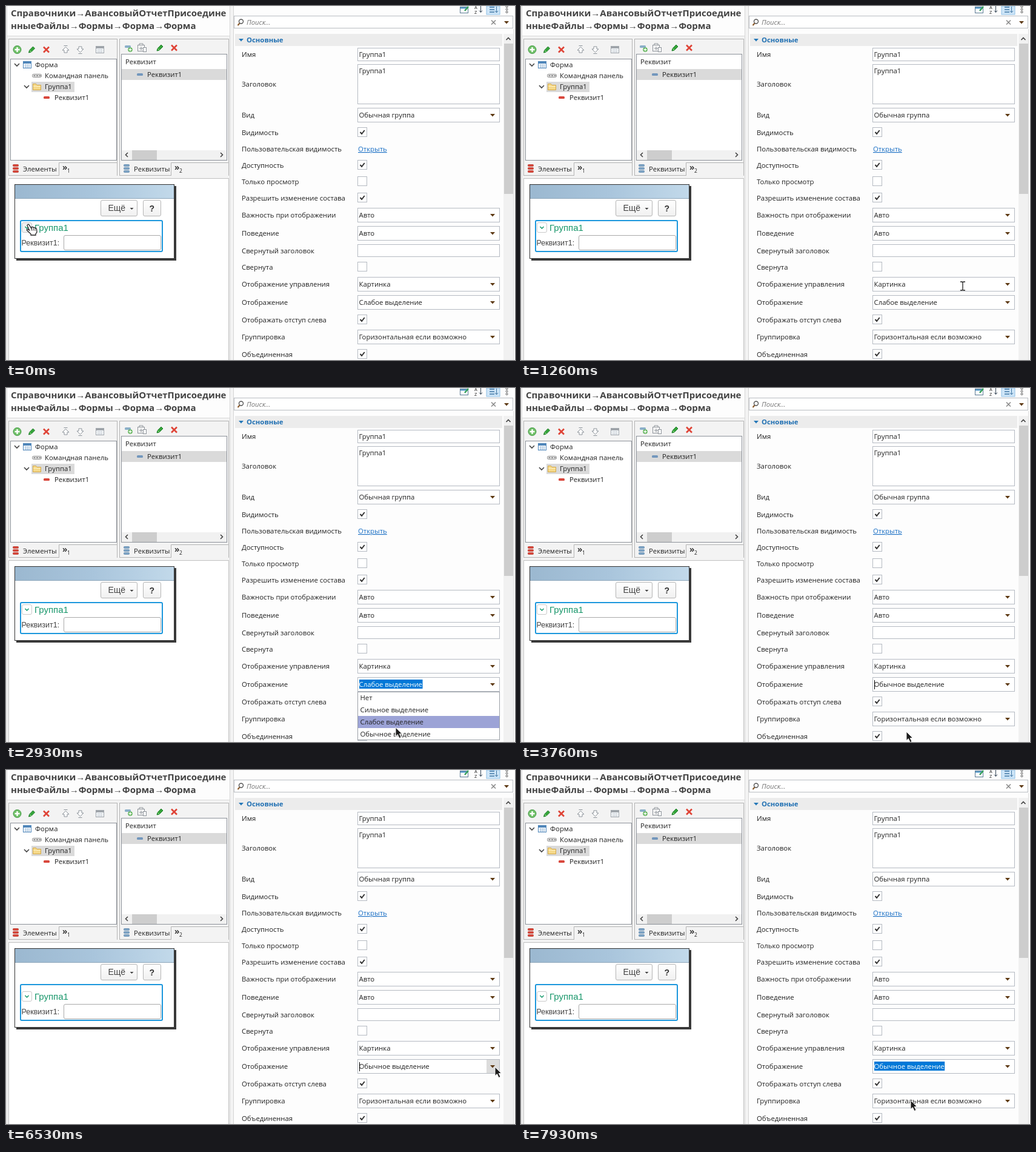
Write an HTML page that moves like this. It is 840 px wide and 584 px high and loops after 8000 ms.

```html
<!DOCTYPE html>
<html lang="ru">
<head>
<meta charset="utf-8">
<style>
html, body { margin: 0; width: 100%; height: 100%; overflow: hidden; background: #fff; }
svg { display: block; width: 840px; height: 584px; }
text { font: 11.35px "Open Sans", "Noto Sans", sans-serif; fill: #222; white-space: pre; }
.title { font-size: 15px; font-weight: 700; fill: #444; }
.bold { font-weight: 700; fill: #1f6fb2; }
.form { font-family: "Liberation Sans", Arial, sans-serif; fill: #444; }
</style>
</head>
<body>
<svg id="stage" viewBox="0 0 840 584" xmlns="http://www.w3.org/2000/svg">
<defs>
<linearGradient id="bar" x2="1" y2="0"><stop stop-color="#9bb8d0"/><stop offset=".5" stop-color="#a9c5dc"/><stop offset="1" stop-color="#c2d9ea"/></linearGradient>
<linearGradient id="btn" x2="0" y2="1"><stop stop-color="#fff"/><stop offset="1" stop-color="#f0f0f0"/></linearGradient>
</defs>
<g id="base"></g>
<g id="form"></g>
<g id="combo"></g>
<g id="popup"></g>
<g id="cursor"></g>
</svg>
<script>
const $ = id => document.getElementById(id);
const box = (x, y, w, h, fill, stroke, extra = '') =>
  `<rect x="${x}" y="${y}" width="${w}" height="${h}" fill="${fill}"${stroke ? ` stroke="${stroke}"` : ''} ${extra}/>`;
const text = (x, y, s, cls = '', style = '') => `<text x="${x}" y="${y}" class="${cls}" style="${style}">${s}</text>`;
const line = (d, stroke, w = 1, extra = '') => `<path d="${d}" fill="none" stroke="${stroke}" stroke-width="${w}" ${extra}/>`;
const shape = (d, fill, stroke = 'none', w = 1) => `<path d="${d}" fill="${fill}" stroke="${stroke}" stroke-width="${w}"/>`;
const at = (x, y, s) => `<g transform="translate(${x} ${y})">${s}</g>`;

const chevron = (x, y, color = '#444') => line(`M${x - 4} ${y - 2}l4 4 4-4`, color, 1.6);
const down = (x, y) => shape(`M${x - 4} ${y - 2}h8l-4 4.5z`, '#5e3a12');
const pencil = (x, y) => at(x, y, shape('M-5 5l1.2-4L2-5 5-2-1 4z', '#35a53a', '#1d7d28') + line('M-3.5 1.5L-.5 4', '#b8e6a8'));
const cross = (x, y) => line(`M${x - 4.5} ${y - 4.5}l9 9m0-9l-9 9`, '#df4437', 2.6);
const bars = (x, y, color, edge) => [0, 5, 10].map(d => box(x + .5, y + d, 9, 3, color, edge, 'rx="1" stroke-width=".7"')).join('');
const pill = (x, y, color) => box(x, y, 10, 4, color, '', 'rx="1.5"');
const dropArrow = (x, y, flip) => at(x, y, shape('M-2.5-5h5v4h3L0 4.5-5.5-1h3z', '#fff', '#8b9299') + line('M-3 6.5h6', '#8b9299'))
  .replace(')"', flip ? ') scale(1 -1)"' : ')"');
const sheet = (x, y, color) => box(x - 6.5, y - 5.5, 13, 11, '#f4f8fc', color) + box(x - 6.5, y - 5.5, 13, 3.5, color) +
  line(`M${x - 4} ${y + .5}h9m-9 3h9`, color, 1, 'stroke-dasharray="2 1"');

const field = (y, h, s = '') => box(580.5, y + .5, 234, h, '#fff', '#b5bac2') + text(582.5, y + 14.5, s);
const combo = (y, s) => box(580.5, y - 11.5, 234, 23, '#fff', '#b5bac2') + text(582.5, y + 4, s) + down(803, y);
const check = (y, on) => box(580.5, y - 7.5, 15, 15, '#fff', '#b5bac2') +
  (on ? line(`M584.5 ${y}l2.6 3 4.6-6`, '#333', 2) : '');

const rows = [
  [80, 'Имя', () => field(69, 21, 'Группа1')],
  [129, 'Заголовок', () => field(96, 65, 'Группа1')],
  [180, 'Вид', y => combo(y, 'Обычная группа')],
  [209, 'Видимость', y => check(y - 1, true)],
  [236, 'Пользовательская видимость', y => text(581, y + 4, 'Открыть', '', 'fill:#1a6fc4;text-decoration:underline')],
  [263, 'Доступность', y => check(y - 1, true)],
  [290, 'Только просмотр', y => check(y - 1)],
  [317, 'Разрешить изменение состава', y => check(y - 1, true)],
  [345, 'Важность при отображении', y => combo(y, 'Авто')],
  [375, 'Поведение', y => combo(y, 'Авто')],
  [404, 'Свернутый заголовок', () => field(393, 20)],
  [431, 'Свернута', y => check(y - 1)],
  [459, 'Отображение управления', y => combo(y, 'Картинка')],
  [489, 'Отображение', () => ''],
  [518, 'Отображать отступ слева', y => check(y - 1, true)],
  [546, 'Группировка', y => combo(y, 'Горизонтальная если возможно')],
  [575, 'Объединенная', y => check(y - 1, true)]
];
const fieldRows = [80, 129, 180, 345, 375, 404, 459, 489, 546];
const items = ['Нет', 'Сильное выделение', 'Слабое выделение', 'Обычное выделение'];

function tabs(x, right, name, num, color, edge) {
  const split = right - (right === 183 ? 96 : 95);
  return bars(x, 261.5, color, edge) + text(x + 17, 273, name) +
    box(split, 258, right - split, 22, '#f3f3f3') + line(`M${split + .5} 280V258.5H${right}`, '#b4b4b4') +
    text(split + 6, 271, '»', '', 'font-size:15px;font-weight:600') + text(split + 14, 275, num, '', 'font-size:8.5px');
}

function leftSide() {
  return box(0, 0, 376, 584, '#f3f3f3') + box(2, 0, 367, 49, '#fdfdfd') + line('M2 49.5h367', '#dadada') +
    text(8, 17, 'Справочники→АвансовыйОтчетПрисоедине', 'title') +
    text(8, 38, 'нныеФайлы→Формы→Форма→Форма', 'title') +
    box(4.5, 54.5, 179, 225, '#f3f3f3', '#b4b4b4') + box(187.5, 54.5, 180, 225, '#f3f3f3', '#b4b4b4') +
    box(7.5, 87.5, 175, 167, '#fff', '#8d929a') + box(190.5, 79.5, 174, 175, '#fff', '#8d929a') +
    // element tree
    `<circle cx="18.5" cy="72" r="6.5" fill="#6fc067" stroke="#479a49"/>` + line('M14.5 72h8m-4-4v8', '#fff', 2.4) +
    pencil(42.5, 72) + cross(66.5, 72) + dropArrow(98.5, 72, true) + dropArrow(122.5, 72) + sheet(155, 72, '#a0a5ab') +
    chevron(18, 97) + sheet(35, 97, '#4f86ba') + text(48, 101, 'Форма') +
    box(43.5, 112.5, 15, 5, '#eee', '#8c8c8c', 'rx="2"') + line('M45.500 115h3m1.500 0h3m1.500 0h3', '#888', 2) +
    text(64, 119, 'Командная панель') +
    box(42, 125, 71, 17, '#dadada') + chevron(34, 133) +
    shape('M44.500 128.500h5l1.500 2h6.500v8h-13z', '#f5d98a', '#d3a848') + line('M45 132.500h12', '#fff0c0') + text(64, 137, 'Группа1') +
    pill(62, 149, '#d9473c') + text(80, 155, 'Реквизит1') +
    tabs(11, 183, 'Элементы', '1', '#d8473a', '#b53228') +
    // attribute list
    pill(196, 65, '#8bafc8') + `<circle cx="205" cy="72" r="3.800" fill="#62b65b"/>` + line('M202.500 72h5m-2.500-2.500v5', '#fff', 1.3) +
    box(217.500, 64.500, 11, 10, '#f5f5f5', '#8f959b') + line('M220 64v-2h6v2m-3 3v6m-3-3h6', '#8f959b') + box(226.500, 68.500, 5, 7, '#fff', '#8f959b') +
    pencil(254, 69) + cross(277.5, 69) +
    text(197, 96, 'Реквизит') + box(191, 104, 173, 18, '#dadada') + pill(216, 111, '#7397bd') + text(233, 117, 'Реквизит1') +
    box(191, 238, 173, 16, '#f1f1f1') + box(208, 238, 41, 16, '#cdcdcd') +
    line('M201 242l-3.500 3.500 3.500 3.500M354 242l3.500 3.500-3.500 3.500', '#444', 1.6) +
    tabs(194, 367, 'Реквизиты', '2', '#7fa5c6', '#5580a6') +
    box(4.5, 284.5, 363, 305, '#fff', '#c0c0c0') + line('M1.500 0v584', '#ddd') + line('M369.500 0v584M375.500 0v584', '#d5d5d5');
}

function rightSide() {
  return box(376, 0, 464, 584, '#fdfdfd') +
    // toolbar
    box(793, 0, 22, 14, '#cfe6f8', '#8fc0e6') +
    box(749.5, 1.5, 13, 10, '#fff', '#5b7b95') + box(750, 2, 10, 2.5, '#5b9cc9') + line('M757 8l6-7', '#35a05a', 2.5) +
    text(773, 5, 'A', '', 'font-size:7.5px') + text(773, 13, 'Z', '', 'font-size:7.5px') + line('M783.500 0v10m-2.500-2.500l2.500 3 2.500-3', '#345') +
    line('M798 2h8m-8 4h8m-8 4h8', '#3f76a4', 1.5) + line('M809.500 1v9m-2.500-2l2.500 3 2.500-3', '#3f76a4') +
    [1, 5.5, 10].map(y => `<circle cx="826.500" cy="${y}" r="1.500" fill="none" stroke="#555"/>`).join('') +
    // search
    box(376.5, 16.5, 460, 20, '#fff', '#b9bdc2') + `<circle cx="388" cy="25.500" r="3.500" fill="none" stroke="#555" stroke-width="1.400"/>` +
    line('M385.500 28.500l-3 3.500', '#8a5a2a', 2) + text(397, 31, 'Поиск...', '', 'font-style:italic;fill:#777') +
    line('M801 23.500l7 7m0-7l-7 7', '#8a8a8a', 1.6) + down(826, 27) +
    // section and scrollbar
    box(378, 46, 441, 20, '#ececec') + shape('M384 54h8l-4 4.500z', '#2377b8') + text(397, 60, 'Основные', 'bold') +
    box(821, 46, 16, 538, '#f1f1f1') + box(822, 62, 15, 248, '#cdcdcd') + line('M825.500 56l3.500-3.500 3.500 3.500', '#444', 1.7) +
    line('M837.500 38v546', '#dcdcdc') +
    rows.map(([y, label, draw]) => text(389, y + 4, label) + draw(y)).join('');
}

function form(dy, hover) {
  return box(17, 297, 264, 123 + dy, '#3a3a3a') + box(14.5, 294.5, 263, 122 + dy, '#fff', '#333') +
    box(15, 295, 262, 22, 'url(#bar)') + line('M15 317.500h262', '#8ea7bb') +
    box(156.5, 320.5, 60, 26, 'url(#btn)', '#b5b5b5', 'rx="2.500"') + text(168.5, 337.5, 'Ещё', 'form', 'font-size:14px') +
    shape('M204.500 333h6l-3 3z', '#444') +
    box(226.5, 320.5, 29, 26, 'url(#btn)', '#b5b5b5', 'rx="2.500"') + text(236.5, 339, '?', 'form', 'font-size:14px;font-weight:700;fill:#333') +
    box(24, 354, 234, 51 + dy, '#fff', '#1c97dc', 'rx="2" stroke-width="2"') +
    at(0, dy, box(26.5, 357.5, 16, 16, hover ? '#f1f1f1' : '#fff', '#c9c9c9', 'rx="2.500"') + line('M31.500 364l3 3 3-3', '#14986a', 1.5) +
      text(47, 371, 'Группа1', 'form', 'font-size:15px;fill:#17966a') +
      text(25.5, 395, 'Реквизит1:', 'form', 'font-size:12.5px') + box(95.5, 378.5, 160, 24, '#fff', '#a9a9a9', 'rx="2.500"'));
}

const arrow = shape('M0 0V14.500L3.400 11.500 6.200 17.500 9 16.200 6.200 10.500H10.500Z', '#1c1c1c', '#fff', .9);
const beam = line('M-4-7h3l1 1 1-1h3M0-6V6M-4 7h3l1-1 1 1h3', '#fff', 2.6) + line('M-4-7h3l1 1 1-1h3M0-6V6M-4 7h3l1-1 1 1h3', '#222', 1.3);
const hand = shape('M-1 1Q0-2 2 0L6 6V4q2-1.500 3 .5 2-1 3 1 2-.5 2.500 1.500l.5 5-2 3v2H5v-2L-1.500 9Q-2.500 7 0 7.500L2.500 9Z', '#fff', '#222', 1.3) +
  line('M6 6l1 4m2-5l.5 4.500M12 6v4', '#222', .9);

// pointer path: time, x, y
const path = [[30, 36, 361], [1260, 729, 462], [2060, 807, 490], [2330, 807, 490], [2960, 642, 560.5], [3200, 636, 567],
  [3760, 636, 567], [4500, 152, 386], [4600, 152, 386], [4900, 143, 394], [5240, 143, 394], [6500, 807, 490], [6830, 807, 490], [7730, 643, 545]];

function pointer(t) {
  if (t <= path[0][0]) return path[0].slice(1);
  const i = path.findIndex(k => k[0] > t);
  if (i < 0) return path[path.length - 1].slice(1);
  const [t0, x0, y0] = path[i - 1], [t1, x1, y1] = path[i];
  const u = (t - t0) / (t1 - t0), e = u * u * (3 - 2 * u);
  return [x0 + (x1 - x0) * e, y0 + (y1 - y0) * e];
}

const put = (id, html) => {
  const el = $(id);
  if (el.last !== html) el.innerHTML = el.last = html;
};

$('base').innerHTML = leftSide() + rightSide();

function draw(t) {
  const [x, y] = pointer(t);
  const open = (t >= 2160 && t < 3260) || (t >= 6660 && t < 7930);
  const selected = open || (t >= 3260 && t < 3560) || t >= 7930;
  const choice = t < 3560 ? 2 : 3;
  const caret = t >= 3560 && !selected;
  const onButton = !open && x > 793 && x < 814 && Math.abs(y - 489) < 11;
  const onToggle = x < 48 && y < 376;

  put('form', form(t < 4100 ? 0 : 8, onToggle));

  put('combo', box(580.5, 477.5, 234, 23, '#fff', '#b5bac2') + (onButton ? box(793, 478, 21, 22, '#dcdcdc') : '') + down(803, 489) +
    (selected ? box(583, 481, 104, 15, '#0078d7', '', 'id="mark"') : '') +
    text(582.5, 493, items[choice], 'value', selected ? 'fill:#fff' : '') + (caret ? line('M583.500 482v15', '#000') : ''));
  if (selected) $('mark').setAttribute('width', $('combo').querySelector('.value').getComputedTextLength());

  const hot = y > 501 ? Math.min(3, Math.floor((y - 501) / 20)) : choice;
  put('popup', open ? box(580.5, 501.5, 234, 79, '#fff', '#9a9fa6') + box(581, 501 + hot * 20, 233, 20, '#9ca3d6') +
    items.map((s, i) => text(584.5, 515 + i * 20, s)).join('') : '');

  const inField = t < 6660 && (t < 2160 || t > 3760) && x > 580 && x < 793 &&
    fieldRows.some(r => Math.abs(y - r) < 11.5);
  put('cursor', onToggle ? hand : inField ? beam : arrow);
  $('cursor').setAttribute('transform', `translate(${x.toFixed(1)} ${y.toFixed(1)})`);
}

const start = performance.now();
function tick() {
  draw((performance.now() - start) % 8000);
  requestAnimationFrame(tick);
}
tick();
</script>
</body>
</html>
```
